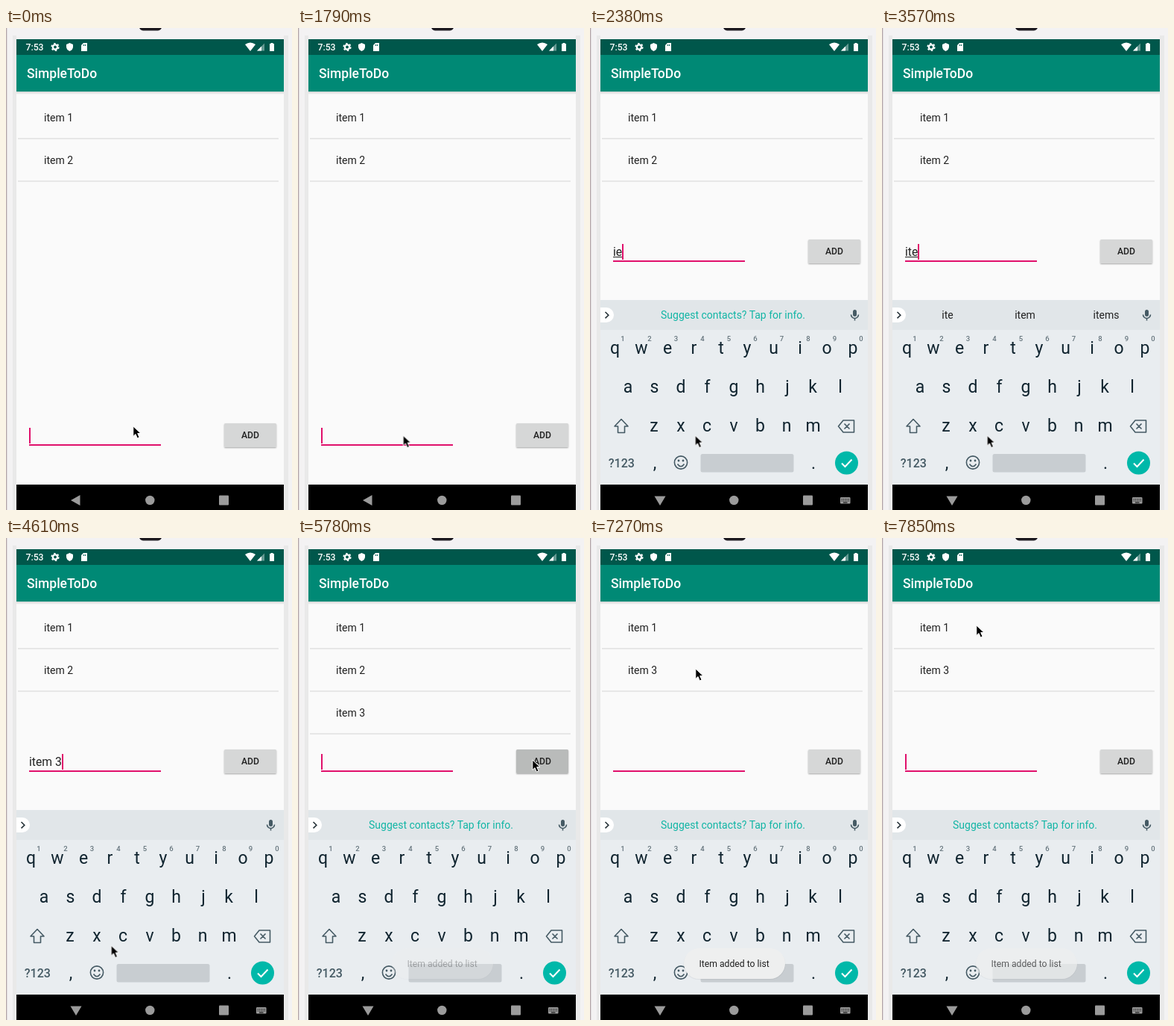
These frames come from a looping animation (384x645 px, 7990 ms). An HTML page:

```html
<!DOCTYPE html>
<html lang="en">
<head>
<meta charset="utf-8">
<title>To-do list demo</title>
<style>
  html, body { margin: 0; width: 100%; height: 100%; overflow: hidden; background: #f3f3f3; }
  svg, .field, .button { position: absolute; left: 0; top: 0; }
  body { font-family: Roboto, "Noto Sans", sans-serif; color: #212121; }
  text { fill: #212121; }
  .mid { text-anchor: middle; }
  .strong { font-weight: 500; }
  .item { font-size: 14px; }
  .item path { stroke: #e0e0e0; stroke-width: 1.7; }
  .key { font-size: 23px; text-anchor: middle; fill: #10242f; }
  .num { font-size: 9.5px; text-anchor: middle; fill: #65747c; }
  .line { fill: none; stroke: #455a64; stroke-width: 1.6; }

  /* Every part shares one clock; most changes are hard cuts. */
  .anim { animation: 7990ms step-end infinite; }

  .lift { animation-name: lift; }
  @keyframes lift { 0% { transform: none; } 27.9%, 100% { transform: translateY(-246px); } }

  .open { animation-name: open; }
  @keyframes open { 0% { opacity: 0; } 27.9%, 100% { opacity: 1; } }
  .closed { animation-name: closed; }
  @keyframes closed { 0% { opacity: 1; } 27.9%, 100% { opacity: 0; } }

  .hint { animation-name: hint; }
  @keyframes hint { 0% { opacity: 1; } 41.05% { opacity: 0; } 72.33%, 100% { opacity: 1; } }
  .words { animation-name: words; }
  @keyframes words { 0% { opacity: 0; } 44.68% { opacity: 1; } 52.06%, 100% { opacity: 0; } }

  .second { animation-name: second; }
  @keyframes second { 0% { opacity: 1; } 89.11%, 100% { opacity: 0; } }
  .third { animation-name: third; }
  @keyframes third {
    0% { opacity: 0; transform: none; }
    72.33% { opacity: 1; transform: none; }
    89.11%, 100% { opacity: 1; transform: translateY(-57px); }
  }

  .toast { animation-name: toast; }
  @keyframes toast {
    0% { opacity: 0; } 72.33% { opacity: .3; } 74.21% { opacity: .8; }
    76% { opacity: 1; } 98.24%, 100% { opacity: .68; }
  }

  .field {
    left: 31px; top: 535px; width: 177px; height: 24px; display: flex;
    box-sizing: border-box; border-bottom: 2px solid #e0106b;
    font-size: 15.7px; line-height: 21px; white-space: pre;
  }
  .typed { text-decoration: underline 1px; animation-name: composing; }
  @keyframes composing {
    0% { text-decoration-color: #212121; }
    52.06%, 100% { text-decoration-color: transparent; }
  }
  .caret { width: 1.8px; height: 21px; background: #e0106b; animation-name: blink; }
  @keyframes blink {
    0%, 9.26%, 22.4%, 41.05%, 70.46%, 83.6%, 94.59% { opacity: 1; }
    3.62%, 14.89%, 33.54%, 65%, 77.97%, 89.11% { opacity: 0; }
    100% { opacity: 1; }
  }

  .typed span { font-size: 0; }
  .c1 { animation-name: c1; } .c2 { animation-name: c2; } .c3 { animation-name: c3; }
  .c4 { animation-name: c4; } .c5 { animation-name: c5; } .c6 { animation-name: c6; }
  .c7 { animation-name: c7; }
  @keyframes c1 { 27.9% { font-size: 1em; } 72.33%, 100% { font-size: 0; } }
  @keyframes c2 { 29.78% { font-size: 1em; } 41.05%, 100% { font-size: 0; } }
  @keyframes c3 { 42.92% { font-size: 1em; } 72.33%, 100% { font-size: 0; } }
  @keyframes c4 { 44.68% { font-size: 1em; } 72.33%, 100% { font-size: 0; } }
  @keyframes c5 { 46.55% { font-size: 1em; } 72.33%, 100% { font-size: 0; } }
  @keyframes c6 { 52.06% { font-size: 1em; } 72.33%, 100% { font-size: 0; } }
  @keyframes c7 { 57.69% { font-size: 1em; } 72.33%, 100% { font-size: 0; } }

  .button {
    left: 293px; top: 529px; width: 70px; height: 32px; border-radius: 1.5px;
    box-shadow: 0 1px 2px #0005;
    font: 500 12.2px/32px Roboto, "Noto Sans", sans-serif; text-align: center;
  }
  .face { height: 100%; border-radius: inherit; animation-name: press; }
  @keyframes press {
    0% { background: #d6d7d7; } 70.46% { background: #b9bbba; }
    74.21% { background: #c8c9c9; } 76%, 100% { background: #d6d7d7; }
  }

  .pointer { animation-name: point; }
  @keyframes point {
    0% { transform: translate(170px, 532px); }
    1.75% { transform: translate(153px, 540px); }
    3.62% { transform: translate(140.5px, 544.5px); }
    57.69% { transform: translate(140.5px, 544.5px); animation-timing-function: steps(6); }
    68.63% { transform: translate(314px, 296px); }
    72.33% { transform: translate(314px, 296px); animation-timing-function: steps(6); }
    83.6% { transform: translate(141px, 174px); }
    90.93% { transform: translate(141px, 174px); animation-timing-function: steps(4); }
    98.24%, 100% { transform: translate(126px, 116px); }
  }
</style>
</head>
<body>
<svg width="384" height="645" viewBox="0 0 384 645">
  <defs>
    <linearGradient id="shade" x2="0" y2="1">
      <stop stop-color="#000" stop-opacity=".16"/>
      <stop offset="1" stop-color="#000" stop-opacity="0"/>
    </linearGradient>
  </defs>

  <!-- phone body -->
  <path fill="#f3f2f3" d="M0 0H384V645H0Z"/>
  <path fill="#b3a5a8" d="M0 0H1.3V645H0Z"/>
  <path fill="#e9e9e9" d="M9 10H14V645H9ZM373 10H379V645H373Z"/>
  <rect x="179" y="-8" width="30" height="11.5" rx="5" fill="#1d1a20"/>
  <path fill="#fafafa" d="M14 15H373V645H14Z"/>

  <!-- status and app bars -->
  <path fill="#00574b" d="M14 15H373V36H14Z"/>
  <path fill="#008975" d="M14 36H373V85H14Z"/>
  <path fill="url(#shade)" d="M14 85H373V89H14Z"/>
  <text class="strong" x="26.5" y="30" font-size="12.2" style="fill:#fff">7:53</text>
  <text class="strong" x="28" y="67" font-size="17.5" style="fill:#fff">SimpleToDo</text>
  <g fill="#fff">
    <circle cx="66" cy="25.5" r="3.1" fill="none" stroke="#fff" stroke-width="2.4"/>
    <circle cx="66" cy="25.5" r="4.8" fill="none" stroke="#fff" stroke-width="1.6" stroke-dasharray="2.5 2.53"/>
    <path d="M85.5 20L90 22V25.5Q89.5 29.5 85.5 31Q81.500 29.500 81 25.500V22Z"/>
    <path d="M104 20H109V31H101V23Z"/>
    <path stroke="#00574b" d="M104.500 22V24M106.500 22V24"/>
    <path d="M321 22Q328 17 335 22L328 31Z"/>
    <path opacity=".4" d="M337 30.500L347 20.500V30.500Z"/>
    <path d="M337 30.500L343 24.500V30.500Z"/>
    <path d="M354 21H355.500V20H358.500V21H360V31H354Z"/>
  </g>

  <!-- list -->
  <g class="item"><text x="51" y="125">item 1</text><path d="M16 148H366"/></g>
  <g class="item anim second"><text x="51" y="182">item 2</text><path d="M16 205H366"/></g>
  <g class="item anim third"><text x="51" y="239">item 3</text><path d="M16 262H366"/></g>

  <!-- navigation bar -->
  <path d="M14 611H373V645H14Z"/>
  <g fill="#9b9b9b">
    <path class="anim closed" d="M87 632L99.500 625V639Z"/>
    <path class="anim open" d="M86.500 626.500H101.500L94 639Z"/>
    <circle cx="193.300" cy="632" r="6.200"/>
    <rect x="286" y="625.500" width="13" height="13" rx="1"/>
    <g class="anim open">
      <rect x="336" y="628" width="13.500" height="8.500" rx="1"/>
      <path stroke="#000" stroke-dasharray="1.300 1" d="M337.500 630.500H348.500M337.500 632.800H348.500"/>
      <path stroke="#000" d="M340 635H345.500"/>
    </g>
  </g>

  <!-- keyboard -->
  <g class="anim open">
    <path fill="#e9edf0" d="M14 364H373V611H14Z"/>
    <path fill="#e1e6e9" d="M14 364H373V404H14Z"/>
    <path fill="#fff" d="M14 374H22A10 10 0 0 1 22 394H14Z"/>
    <path class="line" style="stroke:#263238" d="M20.500 380L24.800 384.200L20.500 388.400"/>
    <text class="mid anim hint" x="192" y="389" font-size="14" style="fill:#12b5a5">Suggest contacts? Tap for info.</text>
    <g class="mid anim words" font-size="14">
      <text x="88" y="389">ite</text><text x="192" y="389">item</text><text x="301" y="389">items</text>
    </g>
    <rect x="353" y="377" width="5" height="9" rx="2.500" fill="#455a64"/>
    <path class="line" d="M350.500 383.500A5 5 0 0 0 360.500 383.500M355.500 388.500V391.500"/>

    <text class="key" y="436" x="33.500 69 104 139.500 176 211 246.500 282 318 353">qwertyuiop</text>
    <text class="num strong" y="419" x="44 80 115.500 151 186.500 222 257.500 293 328.500 364">1234567890</text>
    <text class="key" y="488" x="51 86.500 122 157.500 193 228.500 265 299 336">asdfghjkl</text>
    <text class="key" y="540" x="86 122 157 193 228.500 264 299.500">zxcvbnm</text>
    <path class="line" stroke-linejoin="round" d="M42 523.500L51 533H46.500V541.500H37.500V533H33Z"/>
    <path class="line" stroke-linejoin="round" d="M340 525H354.500V541H340L333.500 533ZM341.500 529.500L348.500 536.500M348.500 529.500L341.500 536.500"/>

    <text class="mid strong" x="42.300" y="587.500" font-size="16" style="fill:#455a64">?123</text>
    <text class="key" x="87 300" y="590">,.</text>
    <circle class="line" cx="122" cy="581.500" r="8.600"/>
    <path class="line" d="M117.500 583.500Q122 590 126.500 583.500"/>
    <g fill="#455a64"><circle cx="119" cy="579" r="1.400"/><circle cx="125" cy="579" r="1.400"/></g>
    <rect x="148.500" y="570" width="125" height="24.500" rx="2.500" fill="#c8cdd1"/>
    <circle cx="344.500" cy="582" r="15.500" fill="#00b8a9"/>
    <path fill="none" stroke="#fff" stroke-width="2" d="M338 582.500L342.500 587L351.500 577.500"/>
  </g>

  <g class="anim toast">
    <rect x="125.500" y="550" width="137" height="41" rx="20.500" fill="#000" opacity=".05"/>
    <rect x="126" y="549" width="136" height="41" rx="20.500" fill="#eeefef"/>
    <text class="mid" x="193.600" y="574" font-size="12.200">Item added to list</text>
  </g>
</svg>

<div class="field anim lift"><span class="typed anim"><span class="anim c1">i</span><span class="anim c2">e</span><span class="anim c3">t</span><span class="anim c4">e</span><span class="anim c5">m</span><span class="anim c6"> </span><span class="anim c7">3</span></span><span class="caret anim"></span></div>

<div class="button anim lift"><div class="face anim">ADD</div></div>

<svg class="pointer anim" width="14" height="20" viewBox="0 0 14 20">
  <path stroke="#fff" d="M.800 1V14.500L4 11.500L6.300 17L9 15.800L6.700 10.500H11Z"/>
</svg>
</body>
</html>
```
